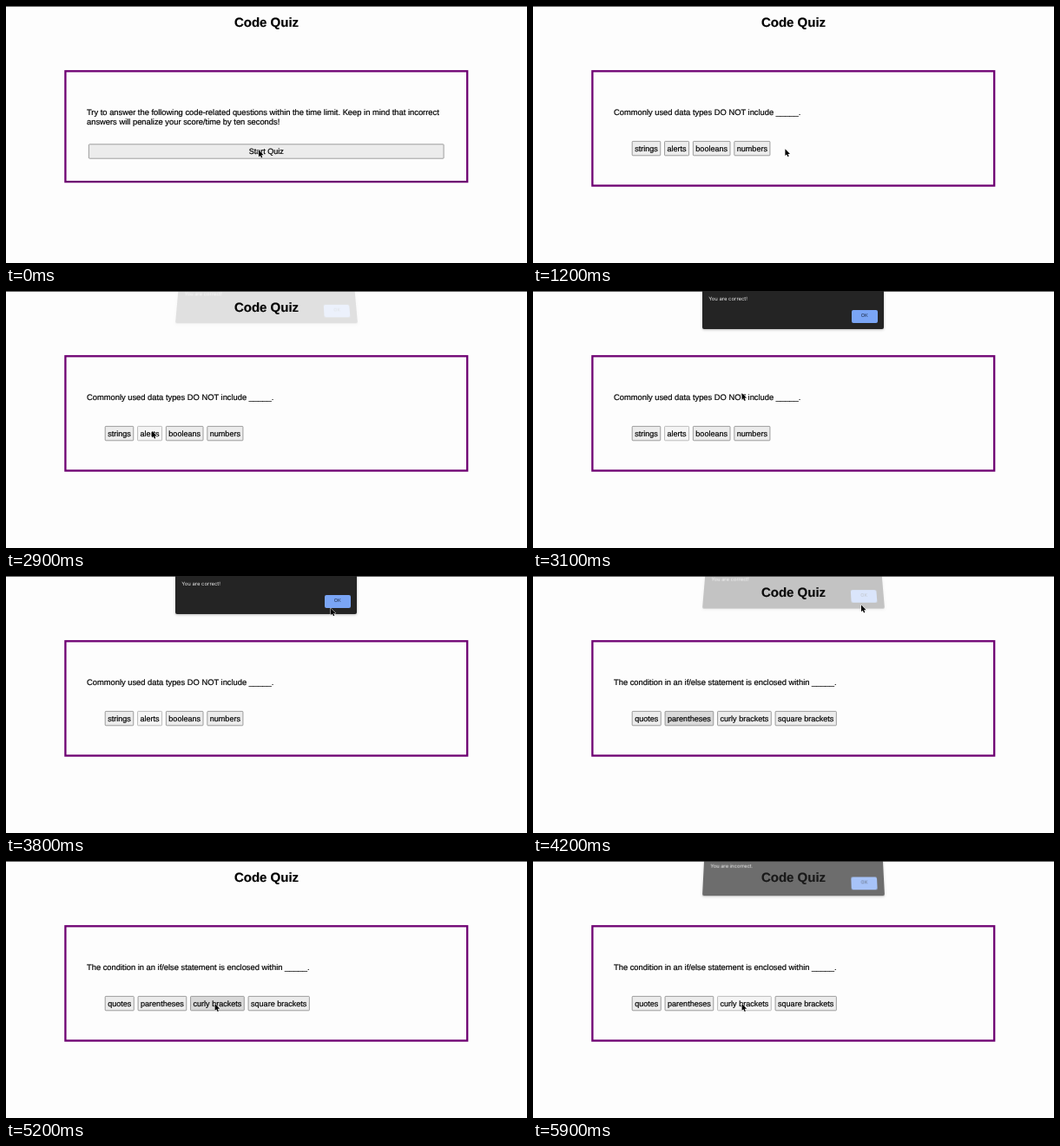
These frames come from a looping animation (600x297 px, 6000 ms). An HTML page:

```html
<!DOCTYPE html>
<html lang="en">
<head>
<meta charset="utf-8">
<title>Code Quiz</title>
<style>
  html, body { margin: 0; width: 100%; height: 100%; overflow: hidden; background: #fdfdfd; }
  svg { position: absolute; left: 0; top: 0; width: 600px; height: 297px; }
  text {
    font: 9.35px "Liberation Sans", Arial, sans-serif; text-rendering: geometricPrecision;
    stroke: #000; stroke-width: .2;
  }
  .title { font-size: 15px; font-weight: bold; text-anchor: middle; }
  .button text { font-size: 9.05px; text-anchor: middle; }
  .button rect { fill: #ececec; stroke: #808080; stroke-width: .75; }
  .button.hover rect { fill: #d9d9d9; }
  .button.active rect { fill: #f5f5f5; stroke: #a8a8a8; }
  #card { fill: none; stroke: #6e0072; stroke-width: 2.3; }
  #dialog {
    position: absolute; left: 194.5px; top: 0; width: 209.6px; height: 44px;
    background: #242424; border-radius: 0 0 2px 2px; box-shadow: 0 1px 3px #0004;
    font: 5.95px/8px Inter, sans-serif; color: #eee;
    transform-origin: 50% 100%; text-rendering: geometricPrecision;
  }
  #message { position: absolute; left: 7.7px; top: 6px; white-space: nowrap; }
  #ok {
    position: absolute; left: 172.3px; top: 22px; width: 30px; height: 15px;
    border-radius: 2px; background: #7aa5f5; color: #20304e;
    font-size: 5.5px; line-height: 15px; text-align: center;
  }
</style>
</head>
<body>
<svg viewBox="0 0 600 297">
  <rect width="600" height="1" fill="#666"/>
  <text class="title" x="300" y="24">Code Quiz</text>
  <rect id="card" x="68.4" y="75.3" width="462.8"/>
  <g id="intro">
    <text x="93" y="126.3">Try to answer the following code-related questions within the time limit. Keep in mind that incorrect</text>
    <text x="93" y="136.8">answers will penalize your score/time by ten seconds!</text>
  </g>
  <g id="first"><text x="93" y="126.3">Commonly used data types DO NOT include _____.</text></g>
  <g id="second"><text x="93" y="126.3">The condition in an if/else statement is enclosed within _____.</text></g>
</svg>
<div id="dialog"><span id="message"></span><div id="ok">OK</div></div>
<svg viewBox="0 0 600 297">
  <path id="cursor" d="M0 0V7.8L1.8 6.2 3 9 4.3 8.4 3.1 5.7H5.6Z" stroke="#fff" stroke-width=".9" paint-order="stroke"/>
</svg>
<script>
const LOOP = 6000, STEP = 100;
const $ = id => document.getElementById(id);
const ramp = (t, start, end) => Math.min(1, Math.max(0, (t - start) / (end - start)));
const ease = f => f * f * (3 - 2 * f);

const startPoint = [291, 166.6];
// Each move may bend towards a control point.
const moves = [
  { start: 0, end: 100, to: [290.4, 165.2] },
  { start: 1500, end: 2300, to: [169, 157], bend: [315, 78] },
  { start: 2300, end: 2600, to: [168, 161.7] },
  { start: 2900, end: 3400, to: [374, 37.3] },
  { start: 3800, end: 4000, to: [378, 33.5] },
  { start: 4500, end: 5200, to: [240.6, 165] }
];

function cursorAt(t) {
  let point = startPoint;
  for (const { start, end, to, bend } of moves) {
    const f = ease(ramp(t, start, end));
    point = point.map((p, i) => {
      const control = bend ? bend[i] : (p + to[i]) / 2;
      return p * (1 - f) ** 2 + 2 * control * f * (1 - f) + to[i] * f * f;
    });
  }
  return point;
}

// How far the dialog is open: shown, dismissed, shown again.
function dialogAt(t) {
  const fade = start => ramp(t, start, start + 150);
  return fade(2880) - fade(4090) + fade(5800);
}

function addButton(parent, label, x, y, width) {
  $(parent).insertAdjacentHTML("beforeend",
    `<g class="button"><rect y="${y}" height="16.4" rx=".8"/><text y="${y + 11.1}">${label}</text></g>`);
  const button = $(parent).lastElementChild, [rect, text] = button.children;
  width ??= text.getComputedTextLength() + 5.9;
  rect.setAttribute("x", x);
  rect.setAttribute("width", width);
  text.setAttribute("x", x + width / 2);
  return { button, right: x + width };
}

function addRow(parent, labels) {
  let x = 114.2;
  return labels.map(label => {
    const { button, right } = addButton(parent, label, x, 156.4);
    x = right + 4.8;
    return button;
  });
}

addButton("intro", "Start Quiz", 95.4, 159.8, 408.7);
const [, alerts] = addRow("first", ["strings", "alerts", "booleans", "numbers"]);
const [, parentheses, curly] = addRow("second", ["quotes", "parentheses", "curly brackets", "square brackets"]);

function setState(button, t, hoverFrom, activeFrom, end) {
  const state = t >= end || t < hoverFrom ? "" : t >= activeFrom ? "active" : "hover";
  button.setAttribute("class", "button " + state);
}

function draw(now) {
  const t = Math.floor(now % LOOP / STEP) * STEP;
  const scene = t < 1200 ? "intro" : t < 4100 ? "first" : "second";
  for (const id of ["intro", "first", "second"]) $(id).style.display = id === scene ? "" : "none";
  $("card").setAttribute("height", scene === "intro" ? 127.8 : 132.3);

  setState(alerts, t, 2300, 2800, 4100);
  setState(parentheses, t, 4100, LOOP, 4300);
  setState(curly, t, 5100, 5800, LOOP);

  const shown = dialogAt(t), tilt = 1 - shown ** 2;
  $("message").textContent = t < 5000 ? "You are correct!" : "You are incorrect.";
  $("dialog").style.opacity = shown;
  $("dialog").style.transform = tilt
    ? `translateY(${-6.8 * tilt}px) perspective(100px) rotateX(${5 * tilt}deg)` : "none";

  $("cursor").setAttribute("transform", `translate(${cursorAt(t)})`);
  requestAnimationFrame(draw);
}
requestAnimationFrame(draw);
</script>
</body>
</html>
```
